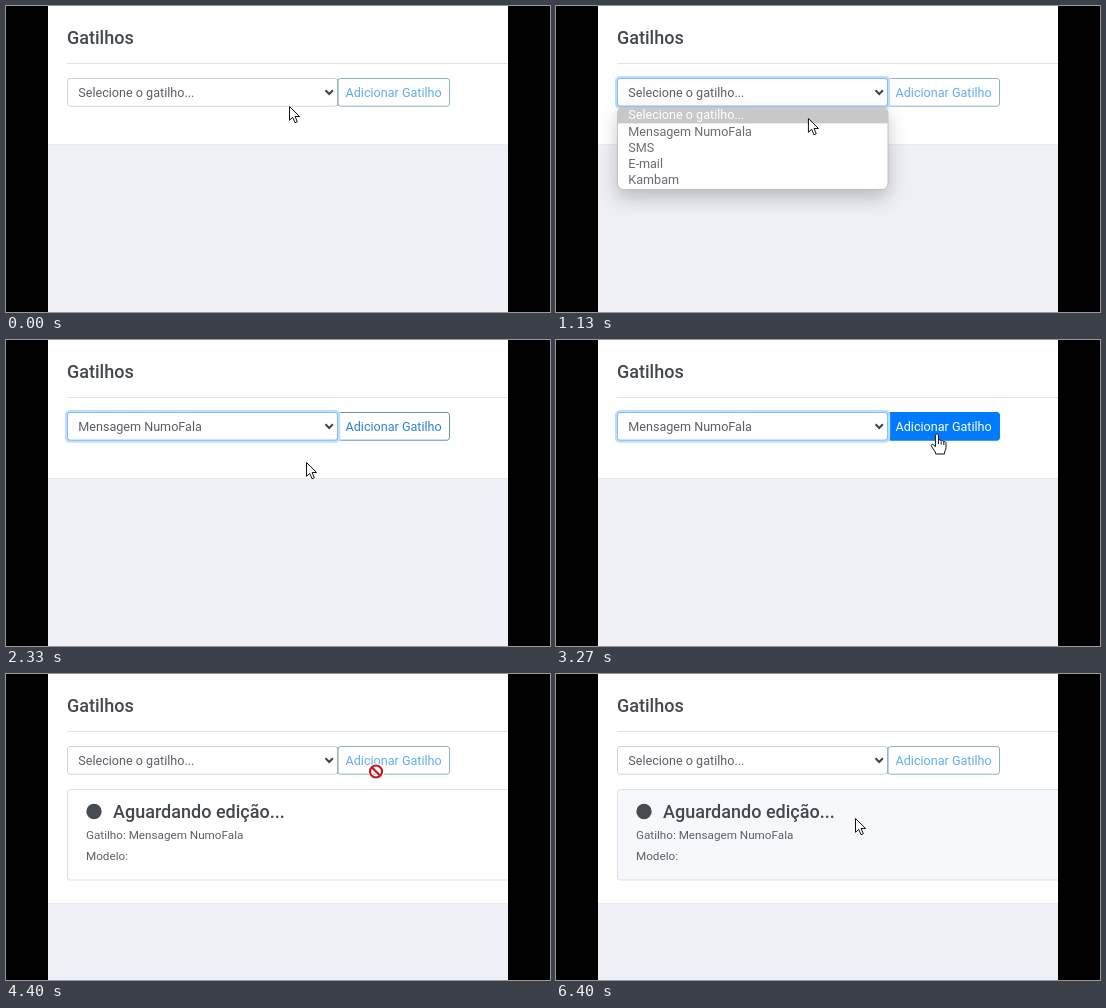
An HTML page for the animation above (6470 ms loop, 544 by 306 pixels).

```html
<!DOCTYPE html>
<html lang="pt">
<head>
<meta charset="utf-8">
<style>
  html, body { margin: 0; width: 100%; height: 100%; overflow: hidden; background: #000; }
  svg { display: block; width: 100vw; height: 100vh; }
  text { font: 12.6px Roboto, Arial, sans-serif; fill: #5a6067; white-space: pre; }
  .title { font-size: 18px; font-weight: 500; fill: #43484e; }
  .small { font-size: 11.7px; }
  #menu { filter: drop-shadow(0 8px 9px rgba(0, 0, 0, .22)); }
  #menu text { fill: #686d72; }
</style>
</head>
<body>
<svg viewBox="0 0 544 306">
  <defs>
    <clipPath id="page"><rect x="42" width="460" height="306"/></clipPath>
    <clipPath id="round"><rect x="61.5" y="101" width="270.5" height="82.5" rx="6"/></clipPath>
  </defs>
  <rect width="544" height="306"/>
  <g clip-path="url(#page)">
    <rect x="42" width="460" height="306" fill="#eff0f6"/>
    <rect id="edge" x="42" width="460" height="139" fill="#e9eaf0"/>
    <rect id="panel" x="42" width="460" height="138" fill="#fff"/>
    <text class="title" x="61" y="38">Gatilhos</text>
    <path d="M61 57.5H502" stroke="#e2e3e5"/>

    <g id="card">
      <rect id="cardBox" x="61.5" y="115.5" width="460" height="90.5" rx="3" stroke="#dcdfe4"/>
      <circle cx="88" cy="137.5" r="7.7" fill="#474c52"/>
      <text class="title" x="107" y="144">Aguardando edição...</text>
      <text class="small" x="80" y="165">Gatilho: Mensagem NumoFala</text>
      <text class="small" x="80" y="186">Modelo:</text>
    </g>

    <rect id="button" x="332" y="72.5" width="111.5" height="27.7" rx="2.5"/>
    <text id="label" x="339.5" y="91">Adicionar Gatilho</text>

    <rect x="61.5" y="72.5" width="270" height="27.7" rx="2.5" fill="#fff" stroke="#ced4da"/>
    <path d="M331.7 73V100" stroke="#93b0bd"/>
    <g id="ring" fill="none">
      <rect x="60.3" y="71.3" width="272.6" height="30.2" rx="3.5" stroke="#bfdeff" stroke-width="2.6"/>
      <rect x="61.5" y="72.5" width="270" height="27.7" rx="2.5" stroke="#80bdff"/>
    </g>
    <text id="value" x="72.3" y="91"></text>
    <path d="M319.5 84.3L323.2 88L326.9 84.3" fill="none" stroke="#3f4449" stroke-width="2"/>

    <g id="menu">
      <rect x="61.5" y="101" width="270.5" height="82.5" rx="6" fill="#fff" stroke="#b5b8bc" stroke-width=".8"/>
      <rect id="mark" x="61.5" width="270.5" height="16.4" clip-path="url(#round)"/>
    </g>

    <g id="arrow">
      <path d="M.5 .5V14.3L3.7 11.3L6 16.7L8.3 15.7L6.1 10.5H10.6Z" fill="#fff" stroke="#111"/>
    </g>
    <g id="hand">
      <path d="M-1.6 1.2C-1.6-.6 1.5-.6 1.5 1.2V6.3C2.2 5.4 4 5.6 4.2 7C5 6.2 6.6 6.5 6.8 7.8C7.7 7.2 9 7.7 9 9.2V13.4C9 16 7.5 17 7.3 20H-1.2C-1.5 17.3-4.2 14.8-5.6 12.1C-6.3 10.6-4.3 9.5-3.1 11L-1.6 12.8Z" fill="#fff" stroke="#111" stroke-linejoin="round"/>
      <path d="M1.5 6V10M4.2 7.5V10.5M6.8 8V11" stroke="#111"/>
    </g>
    <g id="denied" fill="none">
      <circle r="6" stroke="#fff" stroke-width="4"/>
      <path d="M-4.2-4.2L4.2 4.2" stroke="#fff" stroke-width="4"/>
      <circle r="6" stroke="#c4161c" stroke-width="2.2"/>
      <path d="M-4.2-4.2L4.2 4.2" stroke="#c4161c" stroke-width="2.2"/>
    </g>
  </g>
</svg>
<script>
const LOOP = 6470, OPEN = 470, CLOSE = 1930, HOVER = 2670, ADDED = 3670;
const $ = id => document.getElementById(id);
const options = ['Selecione o gatilho...', 'Mensagem NumoFala', 'SMS', 'E-mail', 'Kambam'];
const rows = options.map((name, i) => {
  const row = document.createElementNS('http://www.w3.org/2000/svg', 'text');
  row.setAttribute('x', 72.3);
  row.setAttribute('y', 113.3 + i * 16.2);
  row.textContent = name;
  return $('menu').appendChild(row);
});

// pointer path: time, x, y
const path = [
  [0, 283, 100], [70, 283, 100], [400, 281, 92], [730, 281, 92], [1400, 236, 123],
  [1600, 235, 124], [2000, 235, 124], [2330, 300, 122], [2670, 352, 100], [3130, 379, 94],
  [3270, 381, 94], [4200, 381, 94], [4400, 370, 97.5], [4500, 366, 101], [5000, 307, 142.5],
  [5140, 307, 142.5], [5270, 299, 144], [LOOP, 299, 144]
];

const clamp = v => Math.max(0, Math.min(1, v));
const fade = (t, from) => clamp((t - from) / 150);
const show = (id, on) => $(id).style.display = on ? '' : 'none';
const mix = (a, b, k) => `rgb(${a.map((v, i) => Math.round(v + (b[i] - v) * k))})`;

function pointer(t) {
  const i = Math.max(1, path.findIndex(p => p[0] > t));
  const [a, b] = [path[i - 1], path[i]];
  const k = clamp((t - a[0]) / (b[0] - a[0])), e = k * k * (3 - 2 * k);
  return [a[1] + (b[1] - a[1]) * e, a[2] + (b[2] - a[2]) * e];
}

function drawMenu(t, y) {
  const open = t >= OPEN && t < CLOSE;
  show('menu', open);
  if (!open) return;
  const active = y > 117.4 ? 1 : 0;
  $('mark').setAttribute('y', 101 + active * 16.4);
  $('mark').setAttribute('fill', active ? '#1e90ff' : '#c8c8c8');
  rows.forEach((row, i) => row.style.fill = i === active ? '#fff' : i ? '' : '#7d8185');
}

function drawButton(t) {
  const enabled = t >= CLOSE && t < ADDED;
  const hover = enabled ? fade(t, HOVER) : 0;
  const ink = enabled ? [45, 130, 215] : [98, 174, 236];
  const line = enabled ? [104, 145, 160] : [147, 176, 189];
  $('button').setAttribute('fill', mix([255, 255, 255], [0, 123, 255], hover));
  $('button').setAttribute('stroke', mix(line, [0, 123, 255], hover));
  $('label').style.fill = mix(ink, [255, 255, 255], hover);
}

function draw(t) {
  const [x, y] = pointer(t), added = t >= ADDED;
  drawMenu(t, y);
  drawButton(t);
  $('value').textContent = options[t >= CLOSE && !added ? 1 : 0];
  $('ring').style.opacity = fade(t, OPEN - 70) * (1 - fade(t, ADDED));

  show('card', added);
  $('panel').setAttribute('height', added ? 229 : 138);
  $('edge').setAttribute('height', added ? 230 : 139);
  $('cardBox').setAttribute('fill', mix([255, 255, 255], [247, 248, 252], fade(t, 4700)));

  const shape = t >= HOVER && t < ADDED ? 'hand' : t >= ADDED && t < 4500 ? 'denied' : 'arrow';
  for (const id of ['arrow', 'hand', 'denied']) show(id, id === shape);
  $(shape).setAttribute('transform', `translate(${x} ${y})`);
}

const start = performance.now();
function tick() {
  draw((performance.now() - start) % LOOP);
  requestAnimationFrame(tick);
}
tick();
</script>
</body>
</html>
```
